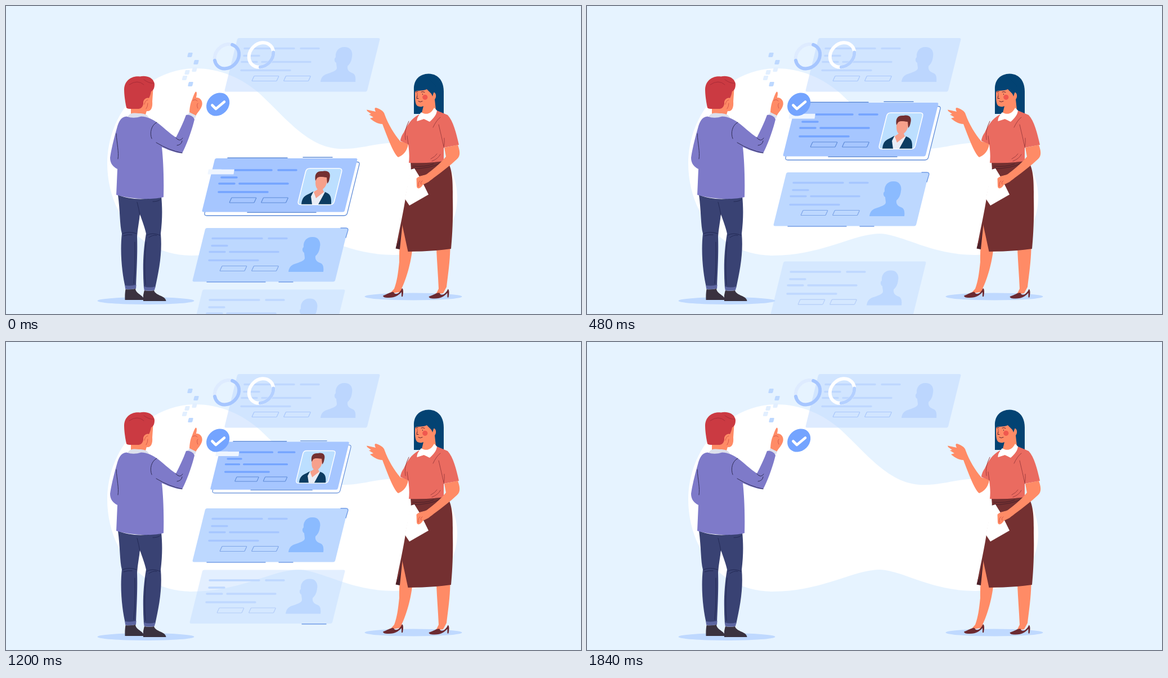
Recreate the animation shown at these times as an HTML page. Size 1022 by 548 pixels, loop 1.92 s.

```html
<!DOCTYPE html>
<html lang="en">
<head>
<meta charset="utf-8">
<title>ID cards</title>
<style>
html, body { margin: 0; width: 100%; height: 100%; overflow: hidden; background: #e6f3ff; }
svg { display: block; width: 100%; height: 100%; }
.line { fill: none; stroke-linecap: round; stroke-linejoin: round; }
</style>
</head>
<body>
<svg viewBox="0 0 1022 548">
  <path fill="#fff" d="M333 111C378 110 420 128 452 157C495 197 535 250 590 254C630 256 655 243 700 243C770 245 802 290 802 340C802 400 762 443 690 443C612 443 560 406 520 405C470 406 420 443 330 444C235 444 180 365 180 280C180 190 250 113 333 111Z"/>
  <g fill="#bfd9ff">
    <ellipse cx="248.500" cy="524.500" rx="86" ry="6.500"/>
    <ellipse cx="724" cy="517" rx="86.500" ry="6.500"/>
  </g>

  <g id="cards"></g>
  <g id="bits"></g>

  <g id="rings" class="line" stroke-width="6"></g>

  <g id="check">
    <ellipse cx="376.700" cy="175" rx="22.300" ry="18.700" transform="rotate(-45 376.700 175)" fill="#74a4ff"/>
    <path class="line" d="M366.500 176.500L373 183L388 170.500" stroke="#fff" stroke-width="4.600"/>
  </g>

  <g id="man">
    <path fill="#ff8b66" d="M222 178V193H248L250 187C257 188 261 182 260 170L261.500 148L240 148Z"/>
    <path fill="#cb3a42" d="M214 181C211 166 210 156 210 148C211 131 225 124 238 125.500C248 123 262 126 264 139C264 146 262 150 258 152C257 157 256 160 254 164C248 162 244 168 244 174C243 179 241 182 236 183H223C219 183 216 183 214 181Z"/>
    <path fill="#ff8b66" d="M244 172C244 164 253 162 254 169C254 176 250 184 244 181Z"/>
    <path class="line" stroke="#d8574a" d="M246 175Q247 168 252 167M249 183Q252 179 252 173"/>
    <path class="line" stroke="#a92c37" d="M219 140Q234 130 245 140M245 131Q256 139 263 137"/>
    <path fill="#dcdfec" d="M216 198C219 190 227 190 236 191C246 191 252 193 255 201Z"/>
    <path fill="#ff8b66" d="M326 193C326 181 328 172 331 166C333 160 335 155 337 152.500C340 152 339 158 338 163C344 162 350 168 348.500 176C347 184 340 189 337 196Z"/>
    <path class="line" stroke="#d8574a" d="M332 168Q337 165 340 169M341 182Q338 176 341 173"/>
    <path fill="#dcdfec" d="M326 189L338 195L336 200L323 194Z"/>
    <path fill="#394273" d="M199 336C203 365 202 390 206 405C202 440 207 480 212 500H231C232 470 234 445 233 410C234 395 237 382 238 370C243 385 247 395 249 405C243 440 243 470 245 502L265 502C272 470 278 440 275 405C278 380 278 360 276 338C250 346 220 345 199 336Z"/>
    <path fill="#5c65a0" d="M211.500 497Q221 499 231.500 496L231 503Q221 505 212 503.500ZM245 499Q255 502 265.500 499L264 505.500Q255 508 245.500 505.500Z"/>
    <path fill="#3a323f" d="M212.500 504Q222 505 230 503C231 513 245 514 245 523H211.500Q211 512 212.500 504ZM246 506Q255 508 263 506C266 516 284 515 284.500 525H244Q243 514 246 506Z"/>
    <path class="line" stroke="#232a55" d="M233 349Q236 360 238 372M261 348Q270 348 275 344M207 405Q219 400 232 405M209 409Q217 406 224 407M250 408Q260 402 274 408M254 412Q260 407 268 408M229 420Q230 460 227 494M249 420Q245 460 248 496"/>
    <path fill="#7e7ac9" d="M214 196.500C204 198 201 205 198 214C192 235 187 255 185 270C185 280 190 286 198 290L196 336C220 343 255 346 280 340C281 300 279 270 277 251C290 257 305 262 313 262C322 245 330 222 335 202C334 196 324 192 320 194C315 208 308 222 302 234C290 226 278 214 268 207C258 200 250 197 240 196.500Q227 201 214 196.500Z"/>
    <path class="line" stroke="#2f2d55" d="M196 227C197 245 201 260 199 272M268 207C258 212 255 226 259 236M267 243Q290 257 313 261.500M301.500 234Q309 243 314 235M304 248Q312 247 313 240"/>
  </g>

  <g id="woman">
    <path fill="#034373" d="M725 192V150C724 131 735 121 751 120.500C770 121 778 135 778 152V192Z"/>
    <path fill="#ff8b66" d="M727 146C727 163 726 177 733 178.500C737 180 740 179 742 178L738 194L745 205L765 194L762 166C766 162 764 152 759 154L752 140Z"/>
    <path fill="#034373" d="M726 153C731 149 740 152 748 148C752 153 757 155 758 161L764 142L748 126L729 135Z"/>
    <circle cx="744.800" cy="162.300" r="4.600" fill="#f0584f"/>
    <path class="line" stroke="#5a2430" d="M731 156V157M740.500 156.500V157.500M728 153L732 152.500M738 153Q741 151.500 744 153.500M733 169.500Q736 172 740 169.500M731 159L730 164.500H733"/>

    <path fill="#ff8b66" d="M641 184.500C648 186 653 187 657 188C655 184 655 181 657 181C663 182 672 187 673 193C680 212 690 228 701 241L715 244C714 257 706 266 697 269C690 264 682 244 669 210C660 210 652 204 647 200L653 198L645 193L649 192L642 187Z"/>
    <path fill="#ff8b66" d="M704 386C699 420 699 440 699 455C697 475 695 490 690 503L682 512L704 508L703 503C712 485 720 455 722 434Z"/>
    <path fill="#ff8b66" d="M765 432H789.500C789 455 786 475 783 500L777 511L764 513L769 503C768 480 766 455 765 432Z"/>
    <path id="shoe" fill="#6c2a31" d="M670 515.500C677 513 685 508 689 509C691 515 699 513 704 502C707 504 706 511 705 517H703L703 509C697 515 690 521 673 518.500Q670 517.500 670 515.500Z"/>
    <use href="#shoe" x="81.500" y="1.500"/>
    <path fill="#4b2129" d="M706 376L692.500 431.500L700 433L704.500 388Z"/>
    <path fill="#743031" d="M719 277L783 274C795 290 794 318 794 340C795 380 793 410 791 432Q755 437 714.500 437L704 388L703 394L700 412L693 431C699 398 707 365 711 335L720 291Z"/>
    <path class="line" stroke="#4b2129" d="M720 290Q755 289 771 280M723 285Q745 287 760 281"/>
    <path fill="#ea6b60" d="M734 193C720 200 712 214 707 225C702 232 701 238 701 240L715 246C717 262 717 270 716 279Q750 280 778 276L778 252L805 247C800 225 795 205 785 194L766 186L745 203Z"/>
    <path class="line" stroke="#a33f40" d="M716 205Q707 222 710 238M715 246L713 231M759 216Q765 203 772 198M769 211Q774 232 778 250M779 235Q780 243 778 252M757 276Q768 272 772 264M755 272Q763 268 766 263"/>
    <path fill="#fff" d="M738 189C733 195 730 200 730.500 205L743 201L753 206C760 200 765 194 766 186L761 181C756 191 748 195 738 189Z"/>
    <path fill="#fff" d="M719 291L726 289L737 307L751 335.500L717 355L709 343Z"/>
    <path fill="#ff8b66" d="M779 252L803 247C807 258 808 266 802 272C785 288 765 302 751 313L741 318C737 325 731 327 730 321L729.500 307C735 301 743 302 748 299C760 290 772 280 782 268Z"/>
    <path class="line" stroke="#d8574a" d="M733 321Q732 313 736 311M738 317Q736 313 740 311"/>
  </g>
</svg>
<script>
const LOOP = 1920, RISE = 99;
const $ = id => document.getElementById(id);
const ease = u => (u = Math.min(1, Math.max(0, u)), u * u * (3 - 2 * u));

// Parallelogram with rounded corners; the top edge leans right by `lean`.
function slab(x, y, w, h, lean, r) {
  const pts = [[x + lean, y], [x + lean + w, y], [x + w, y + h], [x, y + h]];
  const toward = (a, b) => {
    const k = r / Math.hypot(b[0] - a[0], b[1] - a[1]);
    return [a[0] + (b[0] - a[0]) * k, a[1] + (b[1] - a[1]) * k];
  };
  return pts.map((p, i) =>
    `${i ? 'L' : 'M'}${toward(p, pts[(i + 3) % 4])}Q${p} ${toward(p, pts[(i + 1) % 4])}`).join('') + 'Z';
}

const shape = (d, fill, extra = '') => `<path d="${d}" fill="${fill}" ${extra}/>`;
const line = (d, color, w) => `<path class="line" d="${d}" stroke="${color}" stroke-width="${w}"/>`;

const BODY = slab(0, 0, 253.5, 95.5, 23.5, 3);
const ROWS = 'M36 18.5H124M136 18.5H168M35 31.5H62M31 42.5H58M67 42.5H153M30 57.5H117';
const BUTTONS = slab(49, 67.5, 44, 9, 4, 1) + slab(105.5, 67.5, 44, 9, 4, 1);
const BUST = 'M171 78C172 70 176 66 182 64C190 61 199 59 200 54C200 50 199 47 199 44C195 42 195 36 198 34C197 24 203 16 213 16C224 15 229 24 227 33C226 42 223 46 219 50C218 57 222 60 227 62C233 64 234 70 233 78Z';

const writing = (rows, edge, w) => line(ROWS, rows, w) + line(BUTTONS, edge, 1.2);

function blankCard(c) {
  return shape(BODY, '#bdd8ff', `fill-opacity="${c.alpha}"`) + writing(c.rows, c.edge, 3.4) +
    shape(BUST, c.bust) + line(c.accent, '#6f9be6', 1.4);
}

function mainCard() {
  const edge = '#5f8cd8', frame = slab(170, 18, 64, 64.5, 16, 6);
  const portrait =
    shape('M177 82C178 69 184 66 191 63L200 58L219 60C227 63 231 66 230 82Z', '#0c3c61') +
    shape('M199 58L194 68L196 82H207L219 60Z', '#e9edf6') +
    shape('M203 34C201 44 202 52 206 55L199 60L203 71L217 60L215 55C222 50 225 38 223 32L207 30Z', '#f6a08c') +
    shape('M202 40C200 28 204 22 215 23C225 21 230 26 227 36C226 41 225 43 223 45L222 34C214 33 208 32 205 35Z', '#743031');
  return shape(slab(4, 6.5, 253.5, 95.5, 23.5, 5), '#fff', `stroke="${edge}" stroke-width="1.3"`) +
    shape(BODY, '#a6c6ff') +
    line('M46 -.8H152M180 -1.8H232M81 96.2H203', edge, 1.5) +
    `<g transform="translate(0 2.5)">${writing('#74a4ff', edge, 3.6)}</g>` +
    shape(frame, '#bcdfff') + portrait + line(frame, '#fff', 1.6) +
    shape(slab(10.5, 19.5, 46, 9, 1.5, .5), '#eef5ff');
}

const solid = { alpha: 1, rows: '#a6c6ff', edge: '#7fa6e8', bust: '#8bbbff',
  accent: 'M26 96H130M154 96H179M264 0H273Q278 0 276.5 5L273 17' };
const pale = { alpha: .42, rows: '#bfd8ff', edge: '#b4cdf8', bust: '#bdd8ff', accent: 'M200 96.3H243' };
const distant = { alpha: .5, rows: '#bed7fe', edge: '#a9c7fb', bust: '#bcd6fe', accent: '' };

const cards = [
  { x: 348, y: 172, cy: 51, art: mainCard() },
  { x: 331, y: 296, cy: 48, art: blankCard(solid) },
  { x: 326, y: 405.5, cy: 48, art: blankCard(pale) }
];
$('cards').innerHTML = `<g transform="translate(388 57)">${blankCard(distant)}</g>` +
  cards.slice().reverse().map(c => `<g>${c.art}</g>`).join('');
const nodes = [...$('cards').children].slice(1).reverse();

const bit = (x, y, fill) => shape(slab(x, y, 8, 8, 2, 1.5), fill);
$('bits').innerHTML =
  bit(322, 83, '#bdd8ff') + bit(333, 96, '#bdd8ff') + bit(323, 135, '#bdd8ff') +
  bit(317, 114, '#e2efff') + bit(330, 109, '#e2efff') + bit(312.5, 124, '#e2efff');

// Tilted ring with a coloured arc; `from` and `len` are in turns.
function ring(x, y, base, color, from, len) {
  const el = (stroke, extra = '') =>
    `<ellipse rx="23.5" ry="19.8" stroke="${stroke}" pathLength="1" ${extra}/>`;
  return `<g transform="translate(${x} ${y}) rotate(-45)">` + el(base) +
    el(color, `stroke-dasharray="${len} ${1 - len}" stroke-dashoffset="${-from}"`) + '</g>';
}
$('rings').innerHTML =
  ring(392.5, 89.7, '#deebff', '#a6c6ff', .94, .64) +
  ring(453.5, 87, '#fff', '#b4d0ff', .1, .28);

// Cards slide up one after another, then shrink away in the same order.
function draw(t) {
  cards.forEach((c, i) => {
    const lift = RISE * (1 - ease((t - 160 * i) / 320));
    const size = 1 - ease((t - 1120 - 160 * i) / 400);
    nodes[i].setAttribute('display', size > .002 ? 'inline' : 'none');
    nodes[i].setAttribute('transform',
      `translate(${c.x + 139} ${c.y + c.cy + lift}) scale(${size}) translate(-139 ${-c.cy})`);
  });
}

const start = performance.now();
function tick(now) {
  draw(Math.max(0, now - start) % LOOP);
  requestAnimationFrame(tick);
}
draw(0);
requestAnimationFrame(tick);
</script>
</body>
</html>
```
